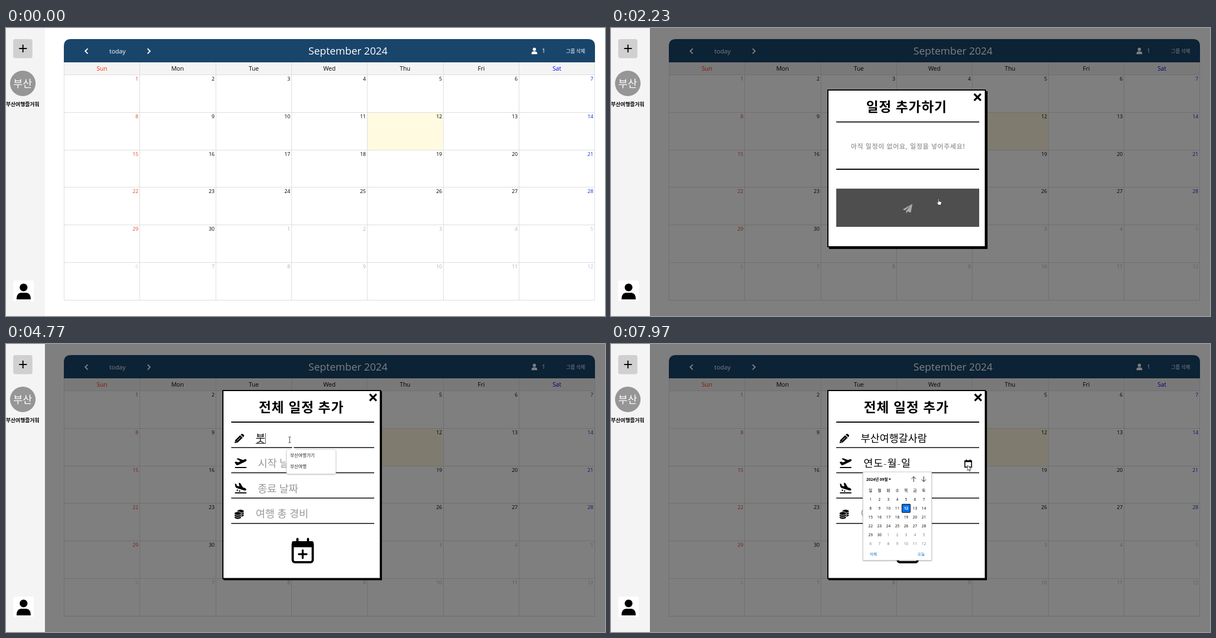
An HTML page that plays this animation: 1077x520 px, repeating every 8 s.

```html
<!DOCTYPE html>
<html lang="ko">
<head>
<meta charset="utf-8">
<title>Group calendar</title>
<style>
html, body { margin: 0; width: 100%; height: 100%; overflow: hidden; background: #fff; }
svg { display: block; width: 100%; height: 100%; }
text { font-family: 'Open Sans', 'Noto Sans CJK KR', sans-serif; white-space: pre; }
</style>
</head>
<body>
<svg id="stage" viewBox="0 0 1077 520"></svg>
<script>
const stage = document.getElementById('stage');

// y is the visual middle of the line of text
const text = (x, y, s, size, attrs = '') =>
  `<text x="${x}" y="${y + size * 0.36}" font-size="${size}" ${attrs}>${s}</text>`;
const rect = (x, y, w, h, fill, attrs = '') =>
  `<rect x="${x}" y="${y}" width="${w}" height="${h}" fill="${fill}" ${attrs}/>`;
const path = (d, attrs = '') => `<path d="${d}" ${attrs}/>`;
const line = (d, width, color = '#000', attrs = '') =>
  path(d, `fill="none" stroke="${color}" stroke-width="${width}" ${attrs}`);
const group = (id, ...parts) => `<g id="${id}">${parts.join('')}</g>`;
const range = n => [...Array(n).keys()];
const MIDDLE = 'text-anchor="middle" ';
const ROUND = 'stroke-linecap="round" stroke-linejoin="round" ';

// September 2024 starts on a Sunday and has 30 days
const dayNumber = i => i < 30 ? i + 1 : i - 29;
const colX = i => Math.floor(104.6 + i * 136.3);
const rowY = j => Math.floor(84.5 + j * 67.8);

function sidebar() {
  return rect(0, 0, 70, 520, '#f4f4f4') +
    rect(13, 20, 34.5, 34.5, '#d0d0d0', 'rx="4"') +
    line('M23.5 37h14M30.5 30v14', 2) +
    '<circle cx="30.2" cy="100" r="23" fill="#969696"/>' +
    text(30, 100, '부산', 18.5, MIDDLE + 'fill="#fff"') +
    text(0, 138, '부산여행즐거워', 9.3, 'font-weight="700"') +
    rect(13, 456, 37, 37, '#fff', 'rx="3"') +
    '<circle cx="31.6" cy="468.4" r="7"/>' +
    path('M19 490q0-12 9-12h7.500q9 0 9 12z');
}

function calendar() {
  const weekdays = ['Sun', 'Mon', 'Tue', 'Wed', 'Thu', 'Fri', 'Sat'];
  const tint = (i, red, blue) => ['' + red, '', '', '', '', '', blue][i] || '#000';
  const header =
    path('M104 62V33q0-13 13-13h929q13 0 13 13v29z', 'fill="#19456b"') +
    line('M147 37.300l-4.600 4.500 4.600 4.500M254.500 37.300l4.600 4.500-4.600 4.500', 1.9, '#fff') +
    text(200.5, 41.5, 'today', 11.2, MIDDLE + 'fill="#fff" font-weight="500"') +
    text(615, 41.5, 'September 2024', 18.5, MIDDLE + 'fill="#fff"') +
    '<circle cx="950" cy="38.500" r="2.900" fill="#fff"/>' +
    path('M944.700 47.300q0-5 4-5h2.600q4 0 4 5z', 'fill="#fff"') +
    text(963.5, 41.5, '1', 11, 'fill="#fff"') +
    text(1007, 41.8, '그룹 삭제', 8.7, 'fill="#fff"');
  const names = weekdays.map((name, i) =>
    text(colX(i) + 68.5, 73.5, name, 10.7, MIDDLE + `fill="${tint(i, '#ff2a00', '#0000f0')}"`));
  const days = range(42).map(i => {
    const col = i % 7, row = Math.floor(i / 7);
    return text(colX(col + 1) - 2, rowY(row) + 7.5, dayNumber(i), 9.2,
      `text-anchor="end" fill="${tint(col, '#e2492c', '#1230e0')}" opacity="${i < 30 ? 1 : 0.3}"`);
  });
  const grid =
    range(8).map(i => `M${colX(i) + 0.5} 62V491`).join('') +
    range(7).map(j => `M104 ${rowY(j) + 0.5}H1059`).join('');
  return header + rect(104, 62, 955, 22, '#f4f4f4') +
    rect(colX(4), rowY(1), 136, 68, '#fffae0') +
    group('selected', rect(colX(3), rowY(1), 136, 68, '#e9f6fb')) +
    line(grid, 1, '#ddd') + names.join('') + days.join('');
}

const panel = (y, height, shadow) =>
  rect(389 + shadow, y + shadow, 285, height, '#000') +
  rect(390, y + 1, 283, height - 2, '#fff', 'stroke="#000" stroke-width="2"');
const closeMark = (x, y) => line(`M${x - 6} ${y - 6}l12 12m0-12l-12 12`, 3.2);
const title = (x, y, s) =>
  text(x, y, s, 24, MIDDLE + 'font-weight="700" letter-spacing="1"');
const rule = (y, width = 1.4) => line(`M405 ${y}H662`, width);

function listModal() {
  return group('listModal',
    panel(111, 285, 3), closeMark(659, 125), title(531.5, 142, '일정 추가하기'),
    rule(169.6, 1.8), rule(255, 1.8),
    text(534, 214, '아직 일정이 없어요, 일정을 넣어주세요!', 11.5,
      MIDDLE + 'fill="#a3a3a3" font-weight="700" letter-spacing=".8"'),
    '<rect id="send" x="405" y="290" width="257" height="69"/>',
    path('M542 317.500L539 333.500 533.500 331.200 530.800 335V330L539 320.500 528.500 329.300 524.500 327.500Z', 'id="sendIcon"'));
}

function fieldIcons() {
  const coin = (x, y) =>
    `<ellipse cx="${x}" cy="${y}" rx="6.300" ry="3.200" stroke="#fff" stroke-width=".9"/>`;
  return path('M411 179L412.200 173.500 421 164.700 425.500 169.200 416.500 178ZM422 163.700L424 162Q425 161.500 428 164.500 428.800 166 426.500 168.200Z') +
    line('M415.500 174.500l6-6M412.800 175.500l2 2', 0.9, '#fff') +
    path('M411 213.500L414 212.300 417 213.800 421.500 211.800 414.500 207.300 417.500 206.300 426 209.600 429 208.300Q432 207.300 432.500 209 433 211 430 212.400L417.500 218.600Q415 219.400 414 218.200Z') +
    path('M411.500 252L414 252.800 415.300 256 419.500 257.200 418.500 250.500 421.300 251.300 426 259 429.500 260Q432.500 261.500 432 263.500 431 265 428 264.200L415 260.200Q412.800 259.200 412.300 257Z') +
    '<circle cx="416" cy="264" r="1.300"/><circle cx="420" cy="265.500" r="1.200"/>' +
    line('M412.500 223H431.500M412.500 268.800H431.500', 2.1, '#000', ROUND) +
    [309, 305.5, 302].map(y => coin(421.8, y)).join('') +
    [313, 309.5, 306].map(y => coin(416.8, y)).join('');
}

const PLACEHOLDER = 'fill="#999" font-weight="300"';
const VALUE = 'font-weight="300"';

function formModal() {
  return group('formModal',
    panel(83, 341.5, 2), closeMark(660, 96.5), title(531, 114, '전체 일정 추가'),
    rule(141, 1.9), [187, 232.5, 278.2, 324].map(y => rule(y)).join(''), fieldIcons(),
    text(449, 170, '일정 이름', 18.5, PLACEHOLDER + ' id="namePlaceholder"'),
    text(449, 170, '', 18.5, VALUE + ' id="name"'),
    line('', 1, '#000', 'id="composing"'),
    line('', 1, '#555', 'id="caret"'),
    text(453, 215.5, '시작 날짜', 18.5, PLACEHOLDER + ' id="startPlaceholder"'),
    group('startDate',
      text(454, 215.5, '연도-월-일', 18.5, VALUE + ' letter-spacing=".9"'),
      line('M636.300 211h12v11.300h-12zM639 208.500v3M645.500 208.500v3', 1.7),
      rect(636, 210, 12.5, 3.2, '#000')),
    text(452.5, 261, '종료 날짜', 18.5, PLACEHOLDER),
    text(449, 306.5, '여행 총 경비', 18.5, PLACEHOLDER),
    rect(515.5, 358, 36, 36, 'none', 'rx="4" stroke="#000" stroke-width="4"'),
    rect(514, 356, 39, 11, '#000', 'rx="3"'),
    line('M524 352v6M543 352v6', 4, '#000', ROUND),
    line('M526.500 379.500h14M533.500 372.500v14', 3.4, '#000', ROUND));
}

function suggestions(id, width, height, firstY, tip, items) {
  return group(id,
    rect(504.5, 190.5, width, height, '#fff', 'rx="3" stroke="#d8d8d8" filter="url(#soft)"'),
    path(`M${516 - tip} 191L516 184.500 ${516 + tip} 191Z`, 'fill="#fff"'),
    items.map((s, i) => text(511, firstY + i * 20.4, s, 8, 'fill="#222"')).join(''));
}

function datePicker() {
  const x = i => 466.8 + i * 15.95, y = j => 281 + j * 16;
  const days = range(42).map(i => {
    const today = i === 11;
    const color = today ? '#fff' : i < 30 ? '#000' : '#777';
    return text(x(i % 7), y(Math.floor(i / 7)), dayNumber(i), 6.9,
      MIDDLE + `fill="${color}" ${today ? 'font-weight="700"' : ''}`);
  });
  return group('picker',
    rect(453, 231, 123.5, 159.5, '#fff', 'stroke="#bbb" stroke-width=".8" filter="url(#soft)"'),
    text(459, 244, '2024년 09월', 7, 'font-weight="700"'),
    path('M499 243h4.600l-2.300 2.600z'),
    line('M544.200 249v-9.500m-4 4l4-4 4 4M562.300 239v9.500m-4-4l4 4 4-4', 0.9),
    [...'일월화수목금토'].map((s, i) => text(x(i), 264.3, s, 7, MIDDLE)).join(''),
    rect(523.2, 289.3, 14.8, 14.8, '#0075ff', 'rx="1" stroke="#101010" stroke-width="1.2"'),
    days.join(''),
    text(465, 379.3, '삭제', 7.2, 'fill="#0878d0"'),
    text(551, 379.3, '오늘', 7.2, 'fill="#0878d0"'));
}

function pointers() {
  const outline = 'fill="#fff" stroke="#222" stroke-width=".8"';
  return group('pointer',
    path('M0 0v9.500l2.200-2 1.500 3.300 1.400-.6-1.500-3.200h3z', outline + ' id="arrow"'),
    path('M0 .6q.9-1.200 1.800 0V4.800l3.500.8q1 .4.900 1.600l-.8 4.500H.8l-3.200-4.200q-.2-1.300 1.200-.9l1.200 1z', outline + ' id="hand"'),
    line('M-2-5.200h1.500l.5.500.5-.5h1.500M0-4.700v9.400M-2 5.200h1.500l.5-.5.5.5h1.500', 0.9, '#222', 'id="beam"'));
}

stage.innerHTML =
  '<defs><filter id="soft" x="-10%" y="-10%" width="120%" height="125%"><feDropShadow dx="0" dy="1" stdDeviation="1" flood-opacity=".25"/></filter></defs>' +
  calendar() + group('shade', rect(70, 0, 1007, 520, '#000', 'opacity=".5"')) + sidebar() +
  listModal() + formModal() +
  suggestions('history', 90, 128, 203, 3, ['test', '서가온테스트중22', '제주도여행', '강릉나들이', '테스트', '테스트테스트']) +
  suggestions('matches', 88.5, 44, 201, 4, ['부산여행가기', '부산여행']) +
  datePicker() + pointers();

const el = {};
stage.querySelectorAll('[id]').forEach(node => el[node.id] = node);
const show = (id, on) => el[id].style.display = on ? '' : 'none';

const route = [
  [330, 966, 488], [1070, 597, 206], [1820, 597, 206], [2230, 588, 308], [3030, 588, 308],
  [3770, 506, 179], [3890, 506, 179], [4020, 510, 173], [6450, 510, 173],
  [6730, 525, 216], [7070, 525, 216], [7840, 641, 219], [8000, 641, 219]
];
const typing = [
  [0, ''], [4240, 'ㅂ'], [4440, '부'], [4770, '붓'], [4900, '부사'], [5040, '부산'],
  [5170, '부산ㅇ'], [5310, '부산여'], [5440, '부산옇'], [5510, '부산여해'], [5580, '부산여행'],
  [5650, '부산여행ㄱ'], [5720, '부산여행가'], [5780, '부산여행갈'], [5850, '부산여행갌'],
  [5920, '부산여행갈사'], [5990, '부산여행갈살'], [6060, '부산여행갈사라'], [6130, '부산여행갈사람']
];
const SELECT = 1340, OPEN = 1470, FORM = 2640, FOCUS = 3770, TYPE = 4240, DATE = 6800, PICK = 7910;

function pointerAt(t) {
  const i = Math.max(1, route.findIndex(p => p[0] > t));
  const [t0, x0, y0] = route[i - 1], [t1, x1, y1] = route[i];
  const u = Math.max(0, (t - t0) / (t1 - t0)), k = u * u * (3 - 2 * u);
  return [x0 + (x1 - x0) * k, y0 + (y1 - y0) * k];
}

function drawName(t) {
  const value = typing.filter(step => step[0] <= t).pop()[1];
  const end = value ? 449 + value.length * 17.02 : 448.5;
  const editing = t >= FOCUS && t < DATE;
  el.name.textContent = value;
  show('namePlaceholder', !value);
  show('caret', editing);
  show('composing', editing && value);
  el.caret.setAttribute('d', `M${Math.floor(end) + 0.5} 161V180`);
  el.composing.setAttribute('d', `M${end - 17} 179.500H${end}`);
}

function drawPointer(t) {
  const [x, y] = pointerAt(t);
  const pressing = t >= OPEN && t < FORM && y > 290;
  const beam = t >= FORM && x < 632;
  show('pointer', t >= 330 && (t < 5510 || t >= 6450));
  el.pointer.setAttribute('transform', `translate(${x} ${y})`);
  show('hand', pressing);
  show('beam', beam);
  show('arrow', !pressing && !beam);
  el.send.setAttribute('fill', pressing ? '#4e4e4e' : '#000');
  el.sendIcon.setAttribute('fill', pressing ? '#aaa' : '#fff');
}

function draw(t) {
  const visible = (id, from, to) => show(id, t >= from && t < to);
  visible('selected', SELECT, OPEN);
  visible('shade', OPEN, 8000);
  visible('listModal', OPEN, FORM);
  visible('formModal', FORM, 8000);
  visible('history', FOCUS, TYPE);
  visible('matches', 4770, 5780);
  visible('startPlaceholder', 0, DATE);
  visible('startDate', DATE, 8000);
  visible('picker', PICK, 8000);
  drawName(t);
  drawPointer(t);
}

const began = performance.now();
function frame() {
  draw((performance.now() - began) % 8000);
  requestAnimationFrame(frame);
}
frame();
</script>
</body>
</html>
```
